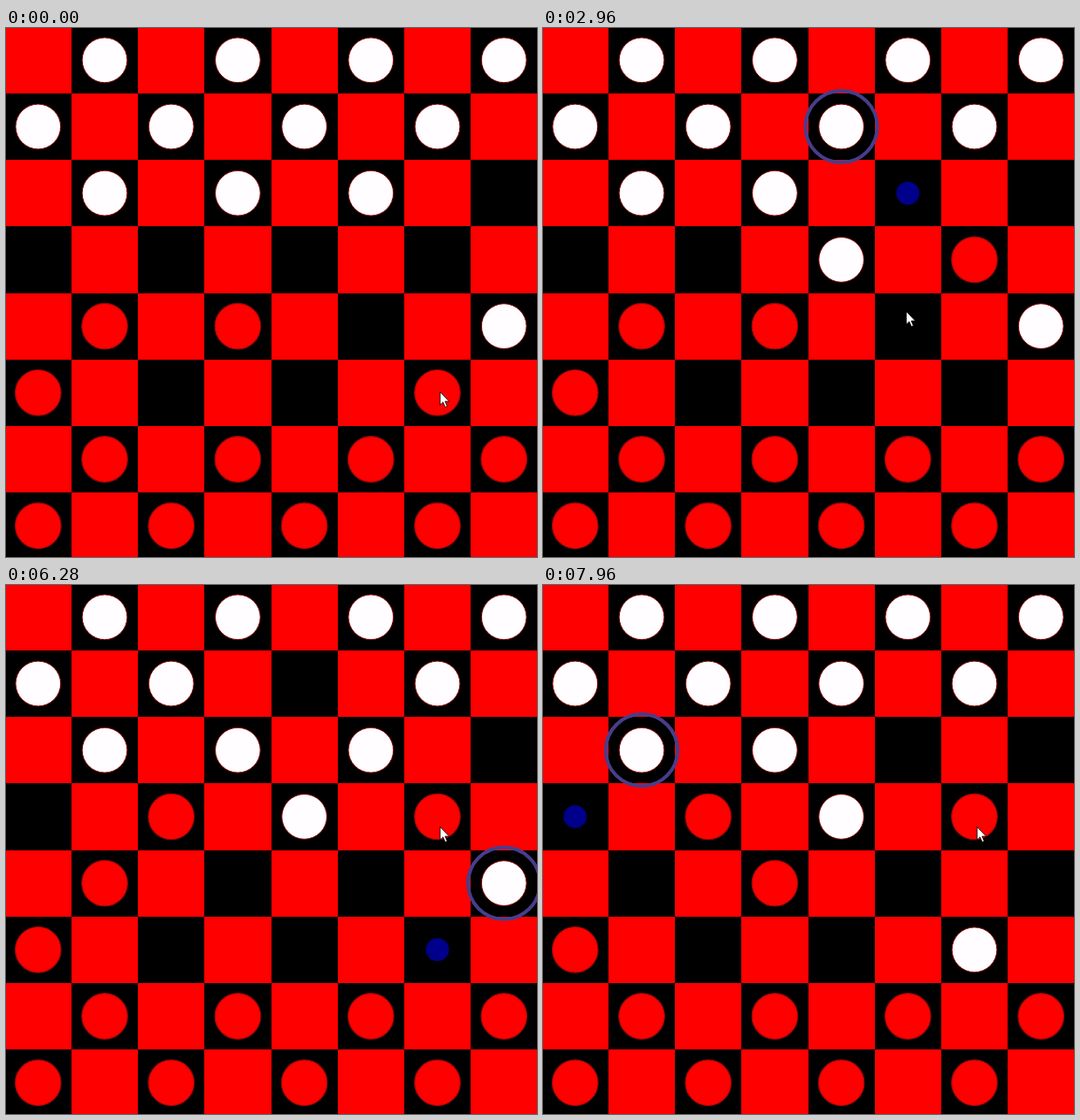
These frames come from a looping animation (600 px wide and 598 px high, 8 s). An HTML page with a canvas:

```html
<!DOCTYPE html>
<html lang="en">
<head>
<meta charset="utf-8">
<title>Checkers search</title>
<style>
  html, body { margin: 0; width: 100%; height: 100%; overflow: hidden; background: #000; }
  canvas { display: block; }
</style>
</head>
<body>
<canvas id="stage" width="600" height="598"></canvas>
<script>
const ctx = document.getElementById('stage').getContext('2d');
const LOOP = 8000, TICK = 40;
const CELL = 75.2, ORIGIN = -1.2;

const start = [
  '.w.w.w.w',
  'w.w.w.w.',
  '.w.w.w..',
  '........',
  '.r.r...w',
  'r.....r.',
  '.r.r.r.r',
  'r.r.r.r.'
].join('').split('');

// Squares are numbered row * 8 + column, so octal literals read as row, column.
const at = (board, row, col) =>
  row < 0 || row > 7 || col < 0 || col > 7 ? null : board[row * 8 + col];

function jumps(board, row, col, dir, side, foe, taken, found) {
  const mid = (row + dir) * 8 + col + side;
  const r = row + 2 * dir, c = col + 2 * side;
  if (at(board, row + dir, col + side) !== foe || at(board, r, c) !== '.') return;
  const all = [...taken, mid];
  found.push({ to: r * 8 + c, taken: all });
  for (const next of [-1, 1]) jumps(board, r, c, dir, next, foe, all, found);
}

function movesOf(board, from) {
  const row = from >> 3, col = from & 7, white = board[from] === 'w';
  const dir = white ? 1 : -1, found = [];
  for (const side of [-1, 1]) {
    if (at(board, row + dir, col + side) === '.') {
      found.push({ to: (row + dir) * 8 + col + side, taken: [] });
    } else {
      jumps(board, row, col, dir, side, white ? 'r' : 'w', [], found);
    }
  }
  return found;
}

function play(board, from, to, taken = []) {
  const next = board.slice();
  next[to] = next[from];
  for (const square of [from, ...taken]) next[square] = '.';
  return next;
}

// Lists every view the three-ply search shows, in the order it visits them.
function search(board, depth = 3, side = 'w', path = '', views = []) {
  const children = [];
  board.forEach((piece, from) => {
    if (piece !== side) return;
    const moves = movesOf(board, from);
    for (const { to, taken } of moves) {
      views.push({ board, from, moves, key: path + from.toString(8) });
      children.push([play(board, from, to, taken),
        path + from.toString(8) + '>' + to.toString(8) + ' ']);
    }
  });
  if (depth > 1) {
    for (const [next, key] of children) {
      search(next, depth - 1, side === 'w' ? 'r' : 'w', key, views);
    }
  }
  return views;
}

const advanced = play(start, 0o56, 0o45);
const answered = play(advanced, 0o25, 0o34);
const pushed = play(answered, 0o45, 0o36);

// Each search runs at an even pace between [time, position] marks.
function thinking(board, begin, marks, end) {
  const views = search(board);
  const points = [[begin, 0], ...marks.map(([t, key]) =>
    [t, views.findIndex(view => view.key === key)])];
  if (end) points.push([end, views.length - 1]);
  return t => {
    let i = 1;
    while (i < points.length - 1 && t > points[i][0]) i++;
    const [t0, n0] = points[i - 1], [t1, n1] = points[i];
    const n = Math.round(n0 + (n1 - n0) * (t - t0) / (t1 - t0));
    return views[Math.min(views.length - 1, Math.max(0, n))];
  };
}

const firstThought = thinking(advanced, 1960, [[2400, '21>32 45>36 23']], 3440);
const secondThought = thinking(pushed, 6160, [
  [6280, '14>25 43>32 47'],
  [7360, '23>32 61>52 12'],
  [7960, '47>56 41>32 21']
]);

function viewAt(t) {
  if (t < 240) return { board: start };
  if (t < 1920) return { board: start, moves: movesOf(start, 0o56) };
  if (t < 1960) return { board: advanced };
  if (t < 3440) return firstThought(t);
  if (t < 4760) return { board: answered };
  if (t < 6120) return { board: answered, moves: movesOf(answered, 0o45) };
  if (t < 6160) return { board: pushed };
  return secondThought(t);
}

function glide(t, t0, t1, a, b) {
  const p = Math.min(1, Math.max(0, (t - t0) / (t1 - t0)));
  const e = p * p * (3 - 2 * p);
  return a.map((v, i) => Math.round(v + (b[i] - v) * e));
}

function pointerAt(t) {
  if (t < 240) return [490, 411];
  if (t < 4000) return glide(t, 1280, 1720, [489, 411], [410, 320]);
  return glide(t, 4960, 5400, [410, 320], [490, 273]);
}

function circle(square, radius, fill, line, width) {
  const x = 36.3 + (square & 7) * CELL, y = 36.3 + (square >> 3) * CELL;
  ctx.beginPath();
  ctx.arc(x, y, radius, 0, Math.PI * 2);
  if (fill) {
    ctx.fillStyle = fill;
    ctx.fill();
  }
  if (line) {
    ctx.strokeStyle = line;
    ctx.lineWidth = width;
    ctx.stroke();
  }
}

function drawBoard(board) {
  ctx.fillStyle = '#000';
  ctx.fillRect(0, 0, 600, 598);
  ctx.fillStyle = '#f00';
  const edge = n => Math.round(ORIGIN + n * CELL);
  for (let row = 0; row < 8; row++) {
    for (let col = row % 2; col < 8; col += 2) {
      ctx.fillRect(edge(col), edge(row), edge(col + 1) - edge(col), edge(row + 1) - edge(row));
    }
  }
  board.forEach((piece, square) => {
    if (piece === 'w') circle(square, 25.4, '#fffdff', '#8b0808', 1);
    if (piece === 'r') circle(square, 25.8, '#f00', '#a00808', 1.2);
  });
}

const arrow = new Path2D('M0 0V14.5L3.3 11.4L5.8 17L8 16L5.6 10.6H10.2Z');

function drawPointer([x, y]) {
  ctx.save();
  ctx.translate(x + 0.5, y + 0.5);
  ctx.fillStyle = '#fff';
  ctx.fill(arrow);
  ctx.strokeStyle = '#000';
  ctx.lineWidth = 0.8;
  ctx.stroke(arrow);
  ctx.restore();
}

function draw(t) {
  const { board, from, moves = [] } = viewAt(t);
  drawBoard(board);
  if (from !== undefined) circle(from, 40.6, null, '#483d8b', 4);
  for (const { to } of moves) circle(to, 13, '#00008b');
  drawPointer(pointerAt(t));
}

const begin = performance.now();
function frame() {
  const t = (performance.now() - begin) % LOOP;
  draw(Math.floor(t / TICK) * TICK);
  requestAnimationFrame(frame);
}
frame();
</script>
</body>
</html>
```
